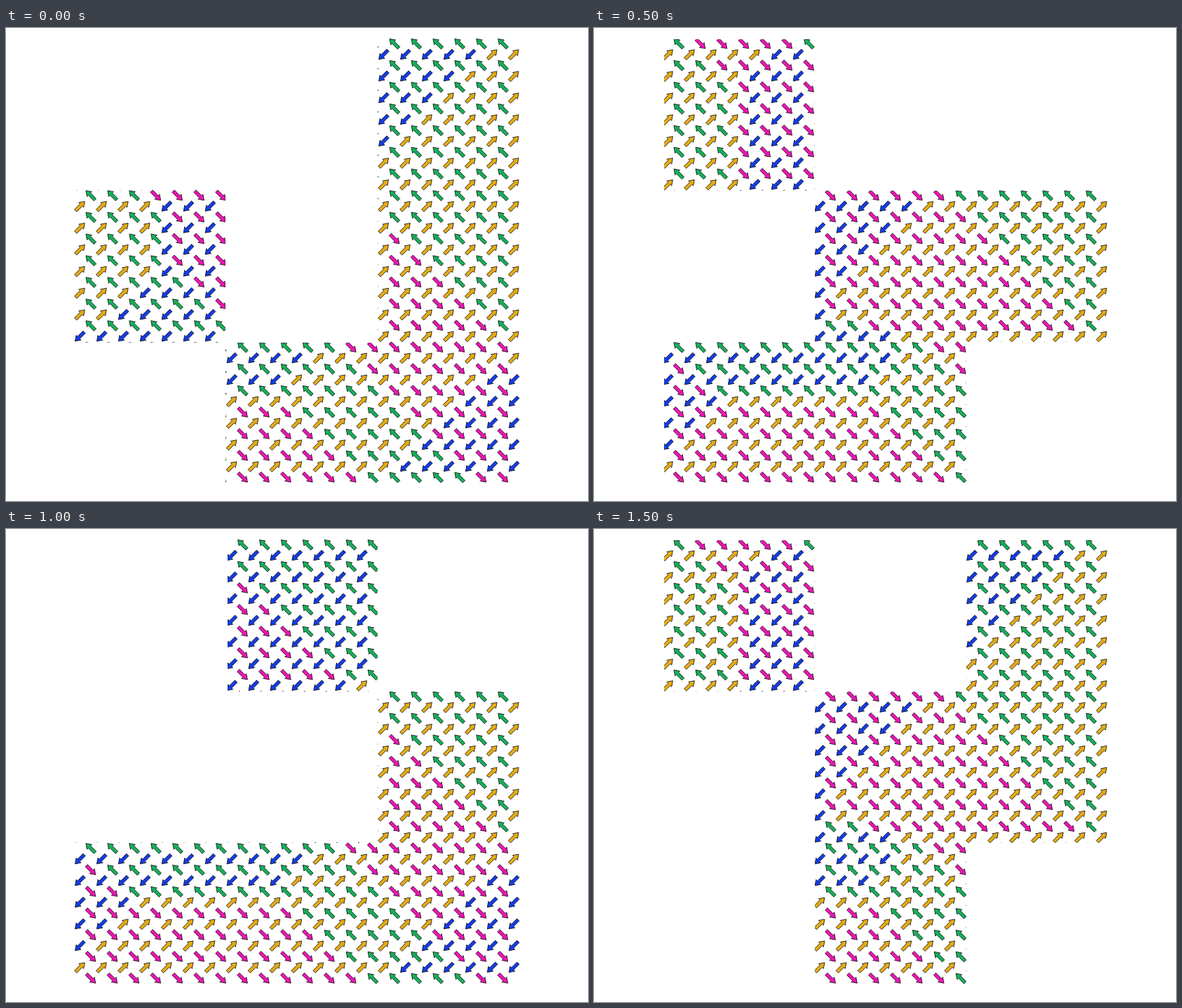
An HTML page with a canvas for the animation above (2 s loop, 830 by 675 pixels).

```html
<!DOCTYPE html>
<html lang="en">
<head>
<meta charset="utf-8">
<title>Arrow lattice</title>
<style>
html, body { margin: 0; width: 100%; height: 100%; overflow: hidden; background: #fff; }
canvas { display: block; }
</style>
</head>
<body>
<canvas id="stage" width="830" height="675"></canvas>
<script>
const ctx = document.getElementById("stage").getContext("2d");
const STEP_MS = 500;
const ROWS = 41;
const ORIGIN = { x: 105.4, y: 22.4 };
const PITCH = 15.47;

const NE = { color: "#e6ac14", angle: -Math.PI / 4 };
const SW = { color: "#143ce6", angle: 3 * Math.PI / 4 };
const NW = { color: "#14b05a", angle: -3 * Math.PI / 4 };
const SE = { color: "#f014b4", angle: Math.PI / 4 };

// Each row holds one middle run of arrows that point against the rest.
const evenStarts = [1, 2, 3, 3, 3, 3, 3, 3, 4, 4, 4, 5, 6, 9, 0, 1, 2, 10, 11, 12, 13];
const oddStarts = [5, 4, 4, 4, 4, 4, 4, 4, 4, 4, 4, 3, 2, 11, 11, 10, 3, 2, 1, 0];

function runEnd(row) {
  const half = row >> 1;
  if (row % 2 === 0) return row < 27 ? half + 6 : half - 2;
  if (row < 27) return Math.max(8, 19 - half);
  return row < 31 ? 21 : 34 - half;
}

function arrowKind(row, col) {
  const odd = row % 2 === 1;
  const start = (odd ? oddStarts : evenStarts)[row >> 1];
  const inRun = col >= start && col < runEnd(row);
  const reversed = row < 27 ? inRun : !inRun;
  if (odd) return reversed ? SW : NE;
  return reversed ? SE : NW;
}

// Visible cells per pose, with the edges of the three columns and rows.
const poses = [
  { cells: ["..#", "#.#", ".##"], xs: [97, 313, 530, 733], ys: [14, 231, 449, 650] },
  { cells: ["#..", ".##", "##."], xs: [100, 315, 531, 733], ys: [16, 232, 448, 650] },
  { cells: [".#.", "..#", "###"], xs: [97, 316, 530, 733], ys: [14, 232, 447, 650] },
  { cells: ["#.#", ".##", ".#."], xs: [100, 315, 531, 733], ys: [16, 232, 448, 650] }
];

const arrow = new Path2D("M-8.7 -2.3H2.6V-4.9L9.8 0L2.6 4.9V2.3H-8.7Z");

function drawArrow(x, y, kind) {
  ctx.save();
  ctx.translate(x, y);
  ctx.rotate(kind.angle);
  ctx.fillStyle = kind.color;
  ctx.fill(arrow);
  ctx.stroke(arrow);
  ctx.restore();
}

function drawField() {
  ctx.strokeStyle = "#111";
  ctx.lineWidth = 0.8;
  for (let row = 0; row < ROWS; row++) {
    const odd = row % 2;
    for (let col = 0; col < 20 + odd; col++) {
      const x = ORIGIN.x + (2 * col + 1 - odd) * PITCH;
      drawArrow(x, ORIGIN.y + row * PITCH, arrowKind(row, col));
    }
  }
}

function drawPose({ cells, xs, ys }) {
  ctx.fillStyle = "#fff";
  ctx.fillRect(0, 0, 830, 675);
  ctx.save();
  ctx.beginPath();
  cells.forEach((line, r) => [...line].forEach((cell, c) => {
    if (cell === "#") ctx.rect(xs[c], ys[r], xs[c + 1] - xs[c], ys[r + 1] - ys[r]);
  }));
  ctx.clip();
  drawField();
  ctx.restore();
}

let shown = -1;
let startTime = null;
function tick(now) {
  startTime ??= now;
  const index = Math.floor((now - startTime) / STEP_MS) % poses.length;
  if (index !== shown) drawPose(poses[shown = index]);
  requestAnimationFrame(tick);
}
requestAnimationFrame(tick);
</script>
</body>
</html>
```
